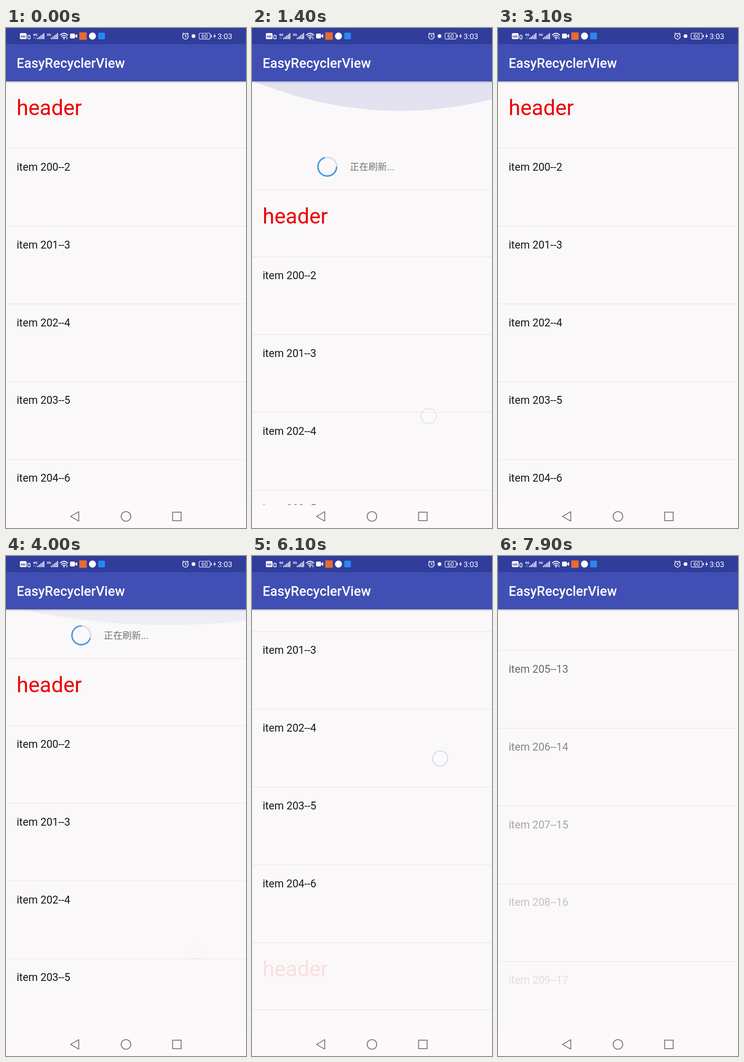
Recreate the animation shown at these times as an HTML page. Size 519 px wide and 1079 px high, loop 8000 ms.

```html
<!DOCTYPE html>
<html lang="zh-CN">
<head>
<meta charset="utf-8">
<title>EasyRecyclerView</title>
<style>
  html, body { margin: 0; width: 100%; height: 100%; overflow: hidden; background: #fbf8f9; }
  svg { display: block; width: 100%; height: 100%; }
  text { font-family: Roboto, "Noto Sans CJK SC", "Noto Sans CJK", sans-serif; }
  .item { font-size: 23.1px; fill: #1b1a1b; }
  .header { font-size: 46.1px; fill: #ea0000; }
  .hint { font-size: 20.1px; fill: #757374; }
  .tiny { font-size: 7.5px; font-weight: 700; }
  .line { fill: none; stroke: #fff; stroke-width: 1.5; }
  .nav { fill: none; stroke: #767475; stroke-width: 1.9; }
</style>
</head>
<body>
<svg viewBox="0 0 519 1079">
  <defs>
    <linearGradient id="shade" x2="0" y2="1">
      <stop offset="0" stop-color="#000" stop-opacity=".16"/>
      <stop offset="1" stop-color="#000" stop-opacity="0"/>
    </linearGradient>
    <g id="ring" fill="none" stroke-width="3.2">
      <circle r="20.2" stroke="#dedbdc"/>
      <path d="M20.2 0A20.2 20.2 0 1 1 -5.2 -19.5" stroke="#479ce0"/>
    </g>
    <path id="bars" d="M0 24v-3h2v3zM3.4 24v-5.5h2v5.5zM6.8 24v-8h2v8zM10.2 24v-10.5h2v10.5zM13.4 24v-13h2v13z"/>
  </defs>

  <rect width="519" height="1079" fill="#fbf8f9"/>
  <g id="list">
    <g id="refresh">
      <use id="spin" href="#ring"/>
      <text id="state" class="hint" x="259.7" y="72.5" text-anchor="middle"></text>
    </g>
    <g id="more">
      <use id="moreSpin" href="#ring"/>
      <text class="hint" x="229" y="1001.5">正在加载更多</text>
    </g>
  </g>
  <path id="glow" fill="#3f51b5"/>
  <circle id="touch" r="16.2" fill="#fff" fill-opacity=".35" stroke="#cfcbe9" stroke-width="2"/>

  <rect y="115" width="519" height="5" fill="url(#shade)"/>
  <rect y="34" width="519" height="81.3" fill="#404fb3"/>
  <rect width="519" height="35" fill="#313d9b"/>
  <text x="23" y="86" font-size="28.8" font-weight="500" fill="#fff">EasyRecyclerView</text>

  <g fill="#fff">
    <rect x="30" y="11" width="14.5" height="13" rx="2.5"/>
    <text x="31.6" y="20.6" class="tiny" fill="#313d9b" style="font-size:8px">HD</text>
    <rect x="47.3" y="15.7" width="4.8" height="7.8" rx="1" class="line"/>
    <text x="58.5" y="17" class="tiny">4G</text>
    <path d="M61 19v5M64 24v-5" class="line" style="stroke-width:.8" opacity=".6"/>
    <use href="#bars" x="67.5"/>
    <text x="88" y="17" class="tiny">3G</text>
    <use href="#bars" x="97"/>
    <path d="M117 15.5q8.5-8 17 0M119.7 18.3q5.8-5.4 11.6 0M122.2 21q3.3-3 6.6 0" class="line" style="stroke-width:1.8"/>
    <circle cx="125.5" cy="23" r="1.6"/>
    <path d="M130 21.5l1.8-2 1.8 2zM130 22.5l1.8 2 1.8-2z"/>
    <rect x="138.5" y="12" width="10.5" height="10.5" rx="2"/>
    <path d="M149.5 16l4.5-3v8.5l-4.5-3z"/>
    <rect x="158.5" y="9.5" width="16" height="16" fill="#e86a35"/>
    <circle cx="187" cy="17.3" r="7.6"/>
    <rect x="199.5" y="10" width="14.5" height="14.5" rx="2.5" fill="#2c86ef"/>
    <g class="line">
      <circle cx="388" cy="18" r="6"/>
      <path d="M388 14.5v4h3M381.5 13l3-2.7M394.5 13l-3-2.7"/>
      <rect x="417.5" y="11.3" width="24" height="12.6" rx="2.5" style="stroke-width:1.1"/>
    </g>
    <circle cx="405.5" cy="17.5" r="4"/>
    <text x="422.5" y="22" font-size="12.3">60</text>
    <rect x="443" y="14.5" width="1.8" height="6" rx=".6"/>
    <path d="M452.3 11.5l-4.2 7h2.7l-1.2 5 4.4-7.2h-2.7z"/>
    <text x="457.5" y="23.6" font-size="16.4">3:03</text>
  </g>

  <rect y="1029" width="519" height="50" fill="#fdf9fa"/>
  <g class="nav">
    <path d="M139.5 1054L157.3 1043.7V1064.3Z" stroke-linejoin="round"/>
    <circle cx="259.4" cy="1054" r="10.4"/>
    <rect x="360.3" y="1044.8" width="18.4" height="18.4"/>
  </g>
</svg>
<script>
const LOOP = 8000, STEP = 100, TOP = 115.3, BOTTOM = 1029, FADE = 300;
const $ = id => document.getElementById(id);

// Piecewise linear track of [time, value] points.
function track(points) {
  return t => {
    const i = points.findIndex(p => p[0] > t);
    if (i === 0) return points[0][1];
    if (i < 0) return points[points.length - 1][1];
    const [t0, a] = points[i - 1], [t1, b] = points[i];
    return a + (b - a) * (t - t0) / (t1 - t0);
  };
}

const scroll = track([
  [500, 0], [600, 15], [1300, 250], [1400, 234], [1500, 165], [1600, 118], [1700, 101],
  [2800, 101], [2900, 62], [3000, 18], [3100, 0],
  [3400, 0], [3500, 20], [3800, 170], [3900, 135], [4000, 106], [4100, 101],
  [5300, 101], [5400, 62], [5500, 18], [5600, 0],
  [6060, 0], [6100, -264.5], [6200, -287],
  [7400, -287], [7500, -420], [7600, -690], [7700, -1020], [7800, -1450], [7900, -1879]
]);
const glowSize = track([
  [500, 0], [1200, 70], [1400, 64], [1800, 0],
  [3400, 0], [3800, 50], [4000, 34], [4300, 0]
]);

// Finger drags: start, end, x and y at both ends; the ring fades after "lift".
const drags = [
  { from: 600, to: 1400, lift: 1350, a: [392, 370], b: [382, 837.5] },
  { from: 3500, to: 4000, lift: 3910, a: [400, 520], b: [412, 853] },
  { from: 6100, to: 6100, lift: 6080, a: [407, 437], b: [407, 437] },
  { from: 7500, to: 7700, lift: 7650, a: [402, 800], b: [410, 330] }
];

const rows = [];
let nextTop = TOP;

function addRow(label, kind, height, baseline) {
  const g = document.createElementNS("http://www.w3.org/2000/svg", "g");
  g.innerHTML = `<rect width="519" height="1" y="-.5" fill="#e4e1e2"/>
    <text class="${kind}" x="23" y="${baseline}">${label}</text>`;
  $("list").append(g);
  rows.push({ g, text: g.lastChild, top: nextTop });
  nextTop += height;
}
const addHeader = () => addRow("header", "header", 144.5, 72.3);
function addItems(first, position) {
  for (let i = 0; i < 5; i++) addRow(`item ${first + i}--${position + i}`, "item", 167.85, 48);
}

addHeader();
addItems(200, 2);
addHeader();
addItems(200, 8);
addItems(205, 13);

// Rows below the first screen fade in once they enter it.
rows.forEach((row, i) => {
  row.enter = i < 6 ? -FADE : i < 7 ? 6000 : 7480;
  while (i > 5 && row.enter < LOOP && row.top + scroll(row.enter) > BOTTOM) row.enter += 2;
});

function hint(t, y) {
  const within = (a, b) => t >= a && t < b;
  if (within(1400, 2400) || within(3900, 5000)) return "正在刷新...";
  if (within(2400, 3100) || within(5000, 5600)) return "刷新完成";
  return y > 101 ? "松开刷新" : "下拉刷新";
}

const place = (el, x, y, turn = 0) =>
  el.setAttribute("transform", `translate(${x} ${y}) rotate(${turn})`);

function draw(t) {
  const y = scroll(t);
  for (const row of rows) {
    place(row.g, 0, row.top + y);
    row.text.setAttribute("opacity", Math.min(1, Math.max(0, (t - row.enter) / FADE)));
  }

  const state = hint(t, y);
  place($("refresh"), 0, y);
  $("refresh").setAttribute("visibility", y > 0 ? "visible" : "hidden");
  $("state").textContent = state;
  $("spin").setAttribute("opacity", state === "正在刷新..." ? 1 : 0);
  place($("spin"), 162.8, 65.2, t < 3000 ? (t - 1400) * .36 : 17 + (t - 4000) * .36);

  $("more").setAttribute("opacity", t >= 6200 && t < 7300 ? 1 : 0);
  place($("moreSpin"), 190, 994, t * .36);

  const h = glowSize(t), cx = t < 3000 ? 320 : 350;
  $("glow").setAttribute("d", `M${cx - 316} 115Q${cx} ${115 + 2 * h} ${cx + 316} 115Z`);
  $("glow").setAttribute("opacity", h * .002);

  const drag = drags.find(d => t >= d.from && t <= d.to);
  $("touch").setAttribute("opacity", drag ? Math.min(1, Math.max(0, 1 - (t - drag.lift) / 100)) : 0);
  if (drag) {
    const k = (t - drag.from) / (drag.to - drag.from || 1);
    place($("touch"), ...drag.a.map((v, i) => v + (drag.b[i] - v) * k));
  }
}

const start = performance.now();
function tick() {
  const t = (performance.now() - start) % LOOP;
  draw(Math.floor(t / STEP) * STEP);
  requestAnimationFrame(tick);
}
tick();
</script>
</body>
</html>
```
